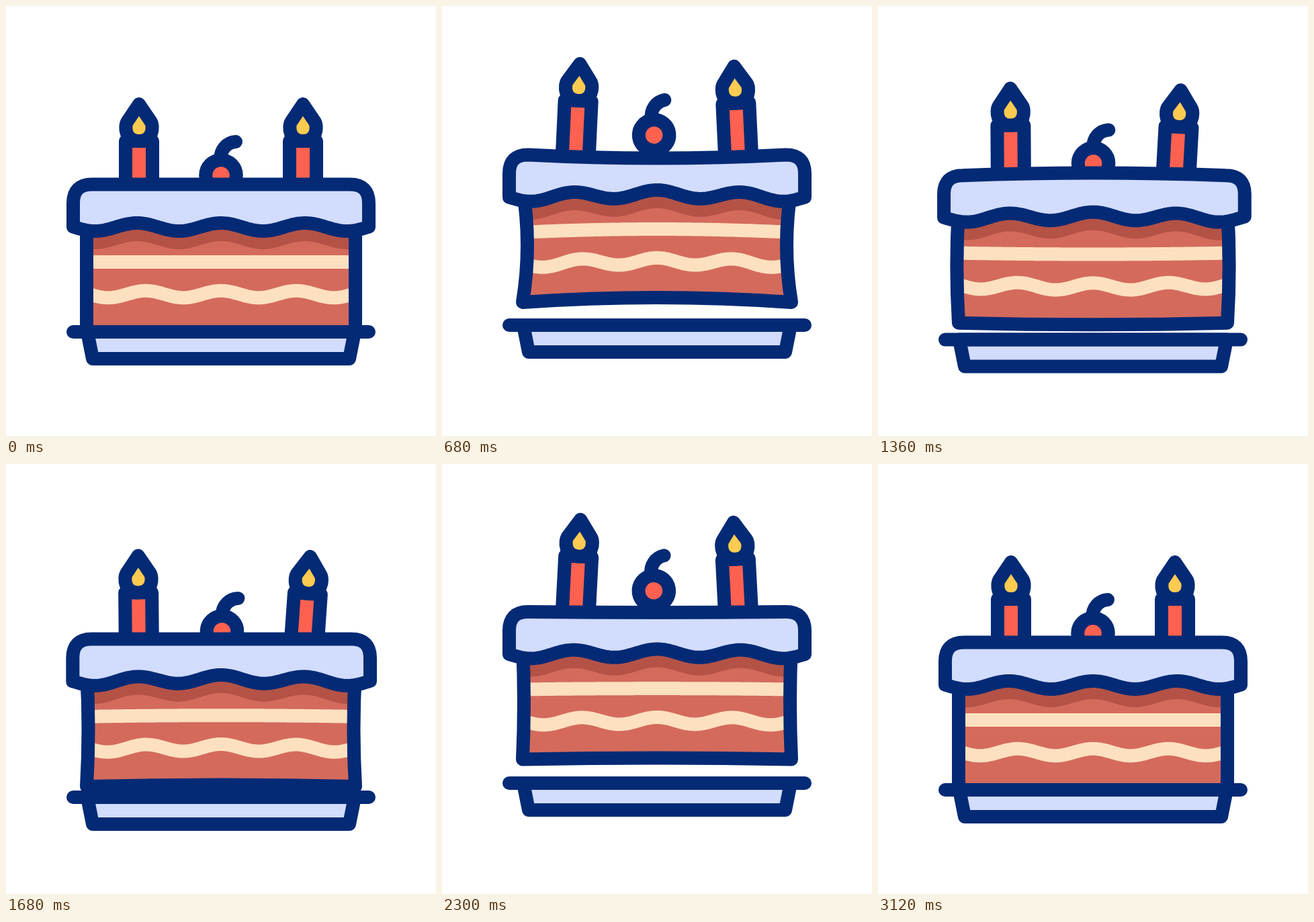
Recreate the animation shown at these times as an HTML page with a canvas. Size 640x640 px, loop 3280 ms.

```html
<!DOCTYPE html>
<html>
<head>
<meta charset="utf-8">
<title>Birthday cake</title>
<style>
html, body { margin: 0; width: 100%; height: 100%; overflow: hidden; background: #fff; }
canvas { display: block; width: 640px; height: 640px; }
</style>
</head>
<body>
<canvas id="stage" width="640" height="640"></canvas>
<script>
const LOOP = 3280, TAU = Math.PI * 2;
const NAVY = '#042a75', ICE = '#d2dcfd', SPONGE = '#d46a5c', SHADE = '#b45246',
  CREAM = '#fde0bf', RED = '#ff6150', GOLD = '#fecb51';
const g = document.getElementById('stage').getContext('2d');

// Pose keys: each track has one value per time.
const TIMES = [220, 450, 680, 800, 1080, 1300, 1520, 1680, 2000, 2300, 2370, 2780, 2940];
const TRACKS = {
  rise:       [0, -17, -44, -50, -40, -20, 0, -5, -28, -45.5, -47, -13, 0],
  plate:      [0, -5, -10, -9.5, -1, 9.5, 15, 11, 0, -10, -10, 0, 0],
  lift:       [0, -6, -16, -20, -13, -12, -3, -4.5, -12, -18, -19, 0, 0],
  cherryLift: [0, -6, -16, -18, -9, -6, 0, 2, -8, -18, -18, 0, 0],
  bow:        [0, 4, 7, 3, -1.5, -3, 0, 2.5, 6, 2, 0.5, 0, 0],
  topBow:     [0, 2, 5, 1, -3, -4, -2, 0, 4, 1, 0, 0, 0],
  waveBow:    [0, -2, -5, -5, -4, -3, -3, -4, -5, -2, -1, 0, 0],
  wide:       [0, 0, 0, 1, 3, 6, 4, 2, 0, 0, 0, 0, 0],
  leanL:      [0, 1, 2.7, 3, 1.7, 0, -1, -0.5, 1.5, 3, 2.8, 0, 0],
  leanR:      [0, -1, -2.7, -2.6, 0, 2.5, 4.5, 4, -1, -3, -3, 0, 0],
  cherryLean: [0, -3, -7, -7, -3.5, 0, 2.5, 2.3, -3, -7.5, -7, 0, 0]
};

// Cubic interpolation that stays flat at turning points.
function at(times, vals, t) {
  const n = times.length - 1;
  if (t <= times[0]) return vals[0];
  if (t >= times[n]) return vals[n];
  let i = 0;
  while (t >= times[i + 1]) i++;
  const slope = k => (vals[k + 1] - vals[k]) / (times[k + 1] - times[k]);
  const tangent = k => {
    if (k === 0 || k === n) return 0;
    const a = slope(k - 1), b = slope(k);
    return a * b <= 0 ? 0 : 2 * a * b / (a + b);
  };
  const h = times[i + 1] - times[i], u = (t - times[i]) / h, v = 1 - u;
  return vals[i] * (1 + 2 * u) * v * v + tangent(i) * h * u * v * v
    + vals[i + 1] * u * u * (3 - 2 * u) - tangent(i + 1) * h * u * u * v;
}

function paint(path, fill, stroke, width = 20) {
  if (fill) { g.fillStyle = fill; g.fill(path); }
  if (stroke) { g.strokeStyle = stroke; g.lineWidth = width; g.stroke(path); }
}

function curve(path, from, to, y) {
  const step = from < to ? 3 : -3;
  for (let x = from; (to - x) * step > 0; x += step) path.lineTo(x, y(x));
  path.lineTo(to, y(to));
}

function pivoted(x, y, degrees, dy, draw) {
  g.save();
  g.translate(x, y + dy);
  g.rotate(degrees * Math.PI / 180);
  g.translate(-x, -y);
  draw();
  g.restore();
}

const candleBody = new Path2D('M178 201H218V300H178Z');
const flame = new Path2D('M198 146L180.5 172C176 179 177 201 198 201C219 201 220 179 215.5 172Z');
const cherryBall = new Path2D('M297.2 252a22.8 22.8 0 1 0 45.6 0a22.8 22.8 0 1 0 -45.6 0');
const stem = new Path2D('M319 229C319 213 329 203 342 202');
const dish = new Path2D('M121 485L129 525H511L519 485Z');
const rim = new Path2D('M100 485H540');

function candle(x, lean, dy) {
  pivoted(x, 300, lean, dy, () => {
    g.translate(x - 198, 0);
    paint(candleBody, RED, NAVY);
    paint(flame, GOLD, NAVY);
  });
}

function drawPlate(p) {
  g.save();
  g.translate(0, p.plate);
  paint(dish, ICE, NAVY);
  paint(rim, null, NAVY);
  g.restore();
}

function drawToppings(p) {
  candle(198, p.leanL, p.rise + p.lift);
  candle(442, p.leanR, p.rise + p.lift * 0.77);
  pivoted(320, 288, p.cherryLean, p.rise + p.cherryLift, () => {
    paint(cherryBall, RED, NAVY);
    paint(stem, null, NAVY);
  });
}

function drawSponge(p, hem) {
  const d = p.rise, b = p.bow, top = 315 + d, low = 485 + d, mid = (top + low) / 2;
  const body = new Path2D();
  body.moveTo(120, top);
  body.quadraticCurveTo(120 + 2 * b, mid, 120, low);
  body.quadraticCurveTo(320, low - 2 * b, 520, low);
  body.quadraticCurveTo(520 - 2 * b, mid, 520, top);
  body.closePath();
  paint(body, SPONGE);

  g.save();
  g.clip(body);
  const shade = new Path2D();
  curve(shade, 110, 530, x => hem(x) - 15);
  curve(shade, 530, 110, x => hem(x) + 27);
  paint(shade, SHADE);
  const sag = x => d - 0.7 * b * (1 - ((x - 320) / 200) ** 2);
  const flat = new Path2D(), wavy = new Path2D();
  curve(flat, 110, 530, x => 381 + sag(x));
  curve(wavy, 110, 530, x => 429 - 5.2 * Math.cos(TAU * (x - 320) / 112) + sag(x));
  paint(flat, null, CREAM);
  paint(wavy, null, CREAM);
  g.restore();
  paint(body, null, NAVY);
}

function drawIcing(p, hem) {
  const left = 100 - p.wide / 3, right = 540 + p.wide, top = 265.5 + p.rise, r = 28;
  const icing = new Path2D();
  icing.moveTo(left, hem(left));
  icing.lineTo(left, top + r);
  icing.quadraticCurveTo(left, top, left + r, top);
  icing.quadraticCurveTo(320, top + 2 * p.topBow, right - r, top);
  icing.quadraticCurveTo(right, top, right, top + r);
  curve(icing, right, left, hem);
  icing.closePath();
  paint(icing, ICE, NAVY);
}

function drawSparks(t) {
  if (t < 2640 || t >= 3110) return;
  const times = [2640, 2780, 2900, 3110];
  const rays = (x, y, angles) => angles.forEach((deg, i) => {
    const long = i === 1;
    const outer = at(times, long ? [50, 79, 102, 108] : [50, 79, 96, 98], t);
    const inner = at(times, long ? [50, 54, 78, 108] : [50, 67, 83, 98], t);
    const a = deg * Math.PI / 180, c = Math.cos(a), s = Math.sin(a);
    const ray = new Path2D();
    ray.moveTo(x + c * inner, y + s * inner);
    ray.lineTo(x + c * outer, y + s * outer);
    paint(ray, null, GOLD);
  });
  rays(131, 278, [-172, -132.5, -90]);
  rays(507, 283, [-105.5, -64.5, -24]);
}

function draw(t) {
  const p = {};
  for (const name in TRACKS) p[name] = at(TIMES, TRACKS[name], t);
  const hem = x => {
    const u = Math.min(1, Math.abs(x - 320) / 200);
    return 329 + p.rise - 6 * Math.cos(TAU * (x - 320) / 125) + p.waveBow * (1 - u * u) ** 2;
  };
  g.fillStyle = '#fff';
  g.fillRect(0, 0, 640, 640);
  g.lineCap = g.lineJoin = 'round';
  drawSparks(t);
  drawPlate(p);
  drawToppings(p);
  drawSponge(p, hem);
  drawIcing(p, hem);
}

const start = performance.now();
function tick() {
  draw((performance.now() - start) % LOOP);
  requestAnimationFrame(tick);
}
tick();
</script>
</body>
</html>
```
